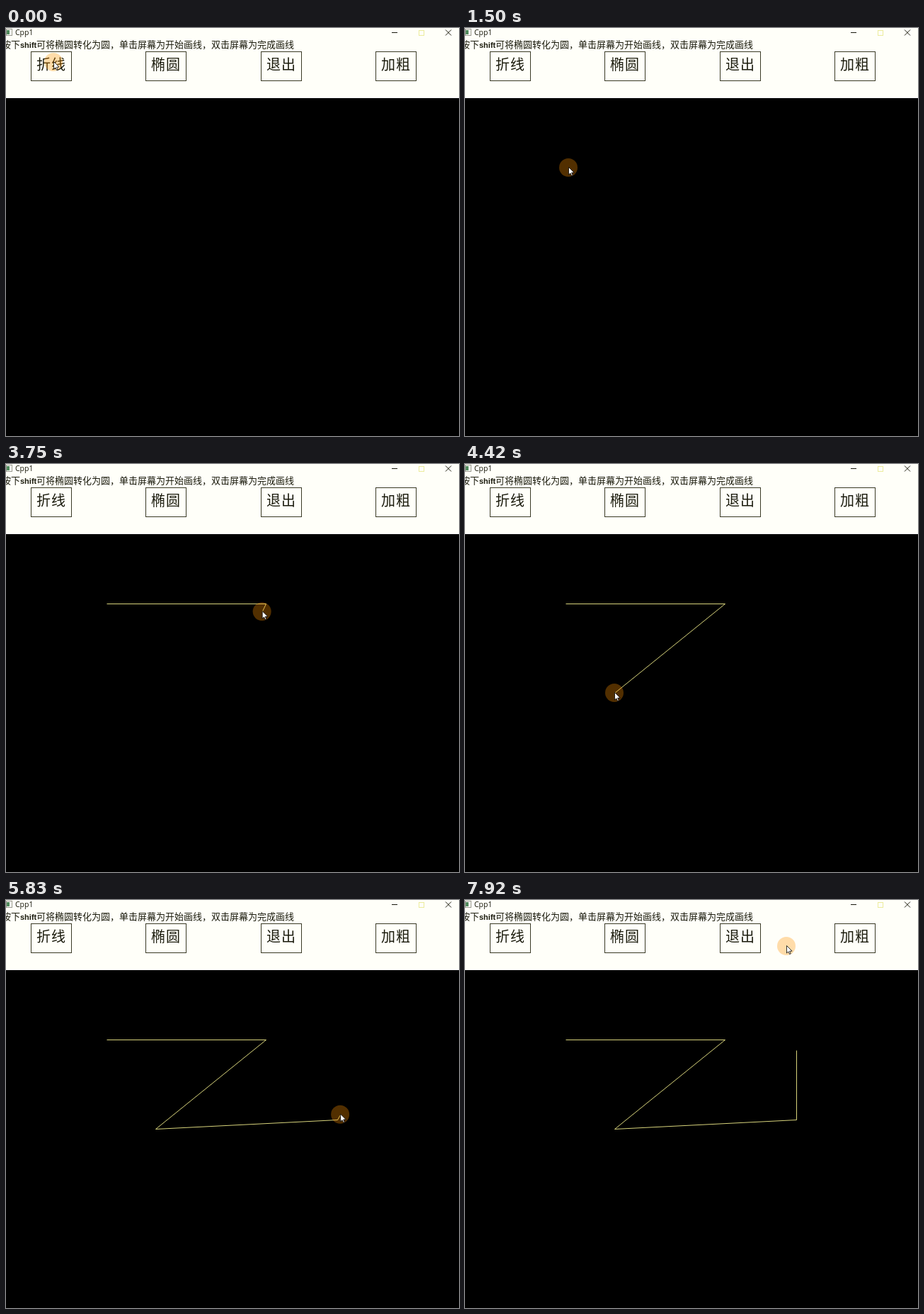
Write an HTML page with a canvas that moves like this. It is 640 by 576 pixels and loops after 8000 ms.

```html
<!DOCTYPE html>
<html lang="zh">
<head>
<meta charset="utf-8">
<style>
  html, body { margin: 0; width: 100%; height: 100%; overflow: hidden; background: #000; }
  canvas { display: block; }
</style>
</head>
<body>
<canvas id="stage" width="640" height="576"></canvas>
<script>
const ctx = document.getElementById('stage').getContext('2d');
const LOOP = 8000, FPS = 12;
const CJK = '"Noto Sans CJK SC", "Noto Sans CJK", sans-serif';
const INK = '#1a1a0c', PAPER = '#fffff9', LINE = '#d8d47c';

// Pointer moves: first step, last step, end point, sideways bend.
const START = [67, 48];
const MOVES = [
  [10, 18, 146, 197, 0, 0],
  [19, 23, 142, 197, 0, 0],
  [27, 33, 226, 258, 0, 0],
  [36, 41, 367, 197, 0, 0],
  [44, 53, 211, 323, 0, 52],
  [56, 66, 468, 310, 0, 34],
  [69, 75, 468, 212, 15, 0],
  [83, 84, 479, 200, 0, 0],
  [84, 90, 555, 68, 0, 0],
  [94, 95, 454, 65, 0, 0]
];

// Clicked corners of the polyline: step, x, y.
const CORNERS = [[23, 142, 197], [41, 367, 197], [53, 211, 323], [66, 468, 310], [75, 468, 212]];
const DONE = 75;

function pointerAt(step) {
  let [x, y] = START;
  for (const [a, b, ex, ey, bx, by] of MOVES) {
    if (step <= a) break;
    const u = Math.min(1, (step - a) / (b - a));
    const s = u * u * (3 - 2 * u), arc = 4 * s * (1 - s);
    x += (ex - x) * s + bx * arc;
    y += (ey - y) * s + by * arc;
  }
  return [x, y];
}

function trace(points, close) {
  ctx.beginPath();
  points.forEach(([x, y]) => ctx.lineTo(x, y));
  if (close) ctx.closePath();
}

function stroke(points, color, width = 1) {
  trace(points);
  ctx.strokeStyle = color;
  ctx.lineWidth = width;
  ctx.stroke();
}

function frame(x, y, w, h, color) {
  ctx.strokeStyle = color;
  ctx.lineWidth = 1;
  ctx.strokeRect(x + .5, y + .5, w, h);
}

function text(str, x, y, font, spacing = 0) {
  ctx.font = font;
  ctx.letterSpacing = spacing + 'px';
  ctx.fillStyle = INK;
  ctx.fillText(str, x, y);
}

function drawTitleBar() {
  frame(0, 1, 8, 9, '#9a9a90');
  ctx.fillStyle = '#4f8a5c';
  ctx.fillRect(1, 3, 4, 6);
  text('Cpp1', 13, 10, '10.5px "Open Sans", sans-serif');
  stroke([[545, 6.5], [553, 6.5]], INK);
  frame(583, 3, 7, 7, '#ecec9c');
  stroke([[621, 2.5], [629, 10.5]], INK);
  stroke([[629, 2.5], [621, 10.5]], INK);
}

function drawHeader() {
  ctx.fillStyle = PAPER;
  ctx.fillRect(0, 0, 640, 99);
  drawTitleBar();
  text('按下', -6, 28, '13px ' + CJK);
  text('shift', 20, 28, 'bold 11px "Liberation Sans", sans-serif');
  text('可将椭圆转化为圆，单击屏幕为开始画线，双击屏幕为完成画线', 43, 28, '13px ' + CJK);
  ['折线', '椭圆', '退出', '加粗'].forEach((label, i) => {
    const x = Math.floor(35 + i * 162.5);
    frame(x, 33, 57, 41, '#3a3a26');
    text(label, x + 8, 59, '20px ' + CJK, 1);
  });
}

function drawPolyline(step, pointer) {
  const points = CORNERS.filter(c => c[0] <= step).map(c => [c[1], c[2]]);
  if (points.length && step < DONE) points.push(pointer);
  if (points.length > 1) stroke(points.map(([x, y]) => [x + .5, y + .5]), LINE);
}

function drawPointer([x, y]) {
  ctx.fillStyle = 'rgba(255,145,0,.32)';
  ctx.beginPath();
  ctx.arc(x, y, 13, 0, Math.PI * 2);
  ctx.fill();
  const arrow = [[0, 0], [0, 10.5], [2.4, 8.4], [4.1, 12], [5.7, 11.3], [4.1, 7.8], [7.6, 7.6]];
  trace(arrow.map(([dx, dy]) => [x + .5 + dx, y - .5 + dy]), true);
  ctx.fillStyle = '#fff';
  ctx.fill();
  ctx.strokeStyle = '#000';
  ctx.lineWidth = .8;
  ctx.stroke();
}

function draw(now) {
  const step = Math.floor((now % LOOP + 5) * FPS / 1000);
  const pointer = pointerAt(step);
  ctx.fillStyle = '#000';
  ctx.fillRect(0, 0, 640, 576);
  drawHeader();
  drawPolyline(step, pointer);
  drawPointer(pointer);
}

const begin = performance.now();
function tick() {
  draw(performance.now() - begin);
  requestAnimationFrame(tick);
}
tick();
</script>
</body>
</html>
```
